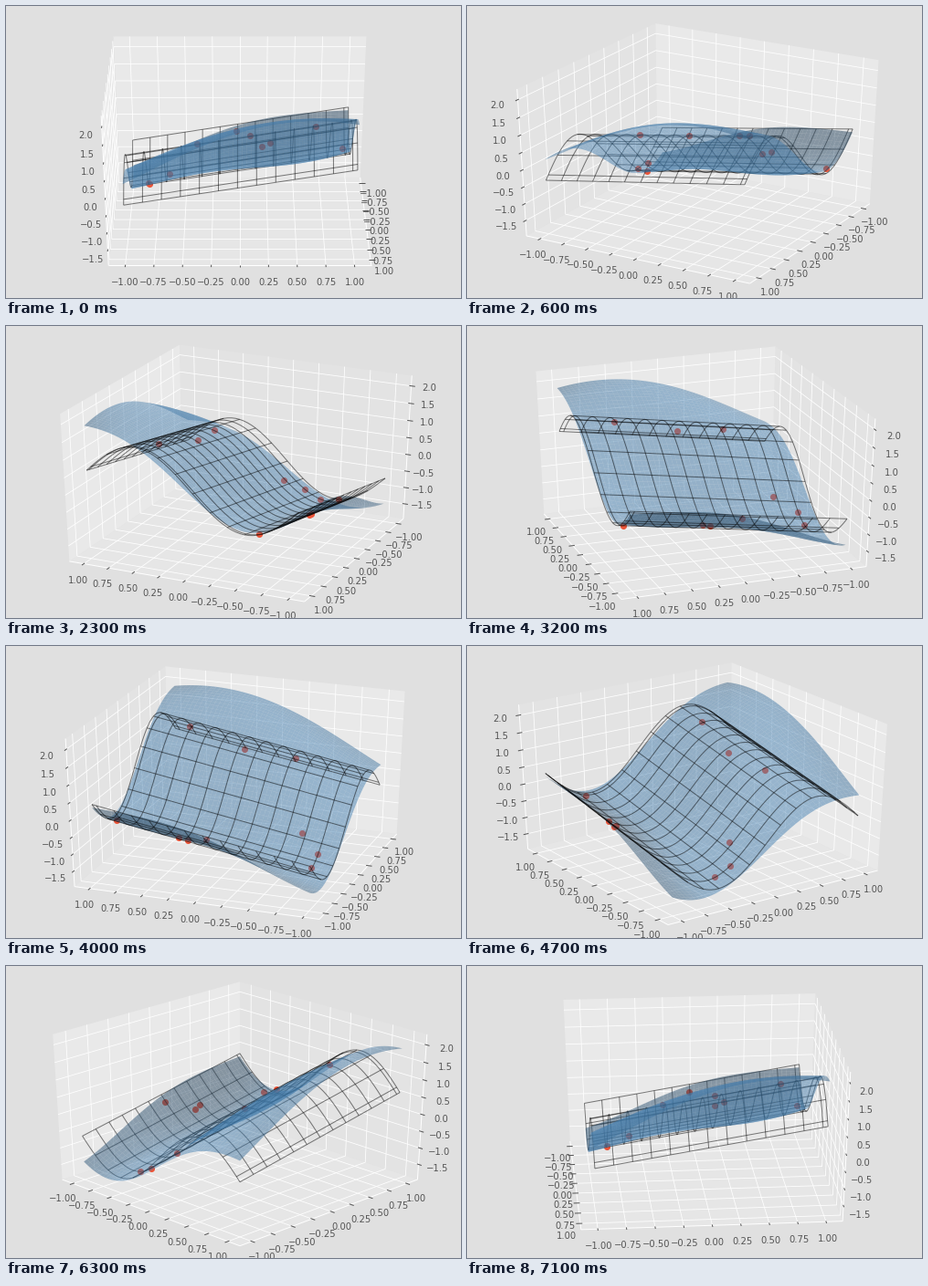
A matplotlib script that plays this animation: 498x320 px, repeating every 7.2 s.

```python
import numpy as np
import matplotlib.pyplot as plt
from matplotlib.animation import FuncAnimation
from matplotlib.collections import LineCollection, PolyCollection

W, H, DPI = 498, 320, 72
FRAMES, INTERVAL = 72, 100
ELEV = np.radians(30)
DIST = 10
CENTER = np.array([256.0, 156.5])
SCALE = np.array([2708, 1764])

# Data box: each axis is normalised to -0.5 .. 0.5
MID = np.array([0, 0, 0.165])
SPAN = np.array([2.2, 2.2, 4.09])
EDGE = 0.5 * (1 + 1 / 24)
LABEL_PAD = 0.0562
TICK_OUT, TICK_IN = 0.2 / 12, 0.1 / 12
TEXT_DROP = 7.9

BACK = "#e0e0e0"
INK = "#555555"
STEEL = np.array([70, 130, 180]) / 255
PANES = ["0.95", "0.90", "0.925"]


def true_height(x, y):
    return np.sin(3 * x) + 0.5 * y


def normalise(x, y, z):
    return (np.stack([x, y, z], axis=-1) - MID) / SPAN


def kernel(a, b):
    """Gaussian similarity with unit length scale."""
    gap = a[:, None, :] - b[None, :, :]
    return np.exp(-0.5 * (gap ** 2).sum(axis=-1))


def fitted_surface(known, gx, gy, ridge=1e-3):
    """Smooth regression surface through known (x, y, z) rows."""
    xy, z = known[:, :2], known[:, 2]
    weights = np.linalg.solve(kernel(xy, xy) + ridge * np.eye(len(z)), z)
    cells = np.column_stack([gx.ravel(), gy.ravel()])
    return (kernel(cells, xy) @ weights).reshape(gx.shape)


def shaded_colors(quads):
    """Brightness 0.5 to 1 by the angle to a fixed light."""
    n = np.cross(quads[:, 1] - quads[:, 0], quads[:, 3] - quads[:, 0])
    n /= np.linalg.norm(n, axis=1, keepdims=True)
    light = n @ np.array([-1, -1, 0.5])
    light = (light - light.min()) / (light.max() - light.min())
    rgb = np.outer(0.5 + 0.5 * light, STEEL)
    return np.column_stack([rgb, np.full(len(rgb), 0.5)])


class Camera:
    def __init__(self, azim):
        a = np.radians(azim)
        c, s = np.cos(a), np.sin(a)
        ce, se = np.cos(ELEV), np.sin(ELEV)
        self.toward = np.array([c * ce, s * ce, se])
        self.right = np.array([-s, c, 0])
        self.up = np.array([-c * se, -s * se, ce])

    def depth(self, p):
        return DIST - p @ self.toward

    def project(self, p):
        p = np.asarray(p, float)
        d = self.depth(p)
        flat = np.stack([p @ self.right / d, -(p @ self.up) / d], axis=-1)
        return CENTER + flat * SCALE


# Geometry
dots_x = np.array([-0.945, -0.805, -0.785, -0.62, -0.437,
                   -0.275, -0.145, 0.364, 0.468, 0.43])
dots_y = np.array([-0.03, 0.28, 0.20, 0.94, -0.83,
                   -0.835, -0.64, 0.09, 0.65, -0.37])
dots_z = true_height(dots_x, dots_y)
dots = normalise(dots_x, dots_y, dots_z)

# Heights along the rim of the fitted surface
rim = [
    (1, -1, 0.24), (1, -0.5, 1.06), (1, 0, 1.66), (1, 0.5, 2.01), (1, 1, 1.89),
    (-1, -1, -1.40), (-1, -0.5, -0.79), (-1, 0, -0.20), (-1, 0.5, 0.17),
    (-1, 1, 0.28), (0, 1, 0.42), (0.5, 1, 1.46), (0.75, 1, 1.80),
    (-0.67, -1, -1.70), (0, -1, -0.72), (0.5, -1, 0.10),
]

grid = np.linspace(-1, 1, 50)
gx, gy = np.meshgrid(grid, grid)
known = np.vstack([np.column_stack([dots_x, dots_y, dots_z]), rim])
surf_z = fitted_surface(known, gx, gy)


def to_quads(p):
    q = np.stack([p[:-1, :-1], p[:-1, 1:], p[1:, 1:], p[1:, :-1]], axis=2)
    return q.reshape(-1, 4, 3)


quads = to_quads(normalise(gx, gy, surf_z))
quad_colors = shaded_colors(to_quads(np.stack([gx, gy, surf_z], axis=-1)))

net = normalise(gx, gy, true_height(gx, gy))
picks = list(range(0, 49, 4)) + [49]
wires = np.concatenate([net[picks], net[:, picks].transpose(1, 0, 2)])

quarter = np.linspace(-1, 1, 9)
half = np.linspace(-1.5, 2, 8)
TICKS = [(i, v, (v - MID[i]) / SPAN[i])
         for i, values in enumerate([quarter, quarter, half]) for v in values]

# Artists
fig = plt.figure(figsize=(W / DPI, H / DPI), dpi=DPI, facecolor=BACK)
ax = fig.add_axes([0, 0, 1, 1])
ax.set_xlim(0, W)
ax.set_ylim(H, 0)
ax.axis("off")

panes = PolyCollection([], facecolors=PANES, edgecolors="none",
                       alpha=0.5, zorder=1)
grid_lines = LineCollection([], colors="white", linewidths=0.8, zorder=2)
axis_lines = LineCollection([], colors="white", linewidths=1, zorder=3)
tick_lines = LineCollection([], colors=INK, linewidths=1, zorder=4)
surface = PolyCollection([], edgecolors="none", zorder=7)
wire_lines = LineCollection([], colors=(0, 0, 0, 0.5), linewidths=1, zorder=8)
for part in (panes, grid_lines, axis_lines, tick_lines, surface, wire_lines):
    ax.add_collection(part, autolim=False)
points = ax.scatter(dots_x, dots_y, s=50, color="#eb5539", linewidths=0, zorder=6)

labels = []
for axis, value, _ in TICKS:
    text = f"{value:.{1 if axis == 2 else 2}f}".replace("-", "\u2212")
    labels.append(ax.text(0, 0, text, size=10, color=INK, ha="center",
                          va="baseline", family="DejaVu Sans", zorder=5))


def moved(p, axis, value):
    q = np.array(p, float)
    q[axis] = value
    return q


def pane_corners(far, axis):
    a, b = [k for k in range(3) if k != axis]
    corners = []
    for sa, sb in [(1, 1), (1, -1), (-1, -1), (-1, 1)]:
        corners.append(moved(moved(far, a, sa * EDGE), b, sb * EDGE))
    return corners


def draw_box(cam):
    # Walls stand on the sides turned away from the viewer
    far = np.where(cam.toward < -1e-9, EDGE, -EDGE)
    panes.set_verts([cam.project(pane_corners(far, i)) for i in range(3)])

    near_side = [1, 0, 0]
    edges = [moved(far, k, -far[k]) for k in near_side]
    axis_lines.set_segments([
        cam.project([moved(e, i, -EDGE), moved(e, i, EDGE)])
        for i, e in enumerate(edges)])

    grids, marks = [], []
    for (axis, _, at), label in zip(TICKS, labels):
        corner = moved(far, axis, at)
        j, k = (axis + 1) % 3, (axis + 2) % 3
        grids.append(cam.project([moved(corner, j, -far[j]), corner,
                                  moved(corner, k, -far[k])]))

        side = near_side[axis]
        foot = moved(edges[axis], axis, at)
        out = np.sign(foot[side])
        marks.append(cam.project([
            moved(foot, side, foot[side] + out * TICK_OUT),
            moved(foot, side, foot[side] - out * TICK_IN)]))

        spot = foot + np.sign(foot) * LABEL_PAD
        spot[axis] = at
        x, y = cam.project(spot)
        label.set_position((x, y + TEXT_DROP))
    grid_lines.set_segments(grids)
    tick_lines.set_segments(marks)


def update(i):
    cam = Camera(360 * i / FRAMES)
    draw_box(cam)

    order = np.argsort(-cam.depth(quads).mean(axis=1))
    surface.set_verts(cam.project(quads[order]))
    surface.set_facecolor(quad_colors[order])
    wire_lines.set_segments(list(cam.project(wires)))
    points.set_offsets(cam.project(dots))

    # Whichever mesh reaches closest to the viewer is painted last
    wire_on_top = cam.depth(wires).min() < cam.depth(quads).min()
    wire_lines.set_zorder(8 if wire_on_top else 6.5)
    return []


anim = FuncAnimation(fig, update, frames=FRAMES, interval=INTERVAL,
                     repeat=True, repeat_delay=0, blit=False)
plt.show()
```
